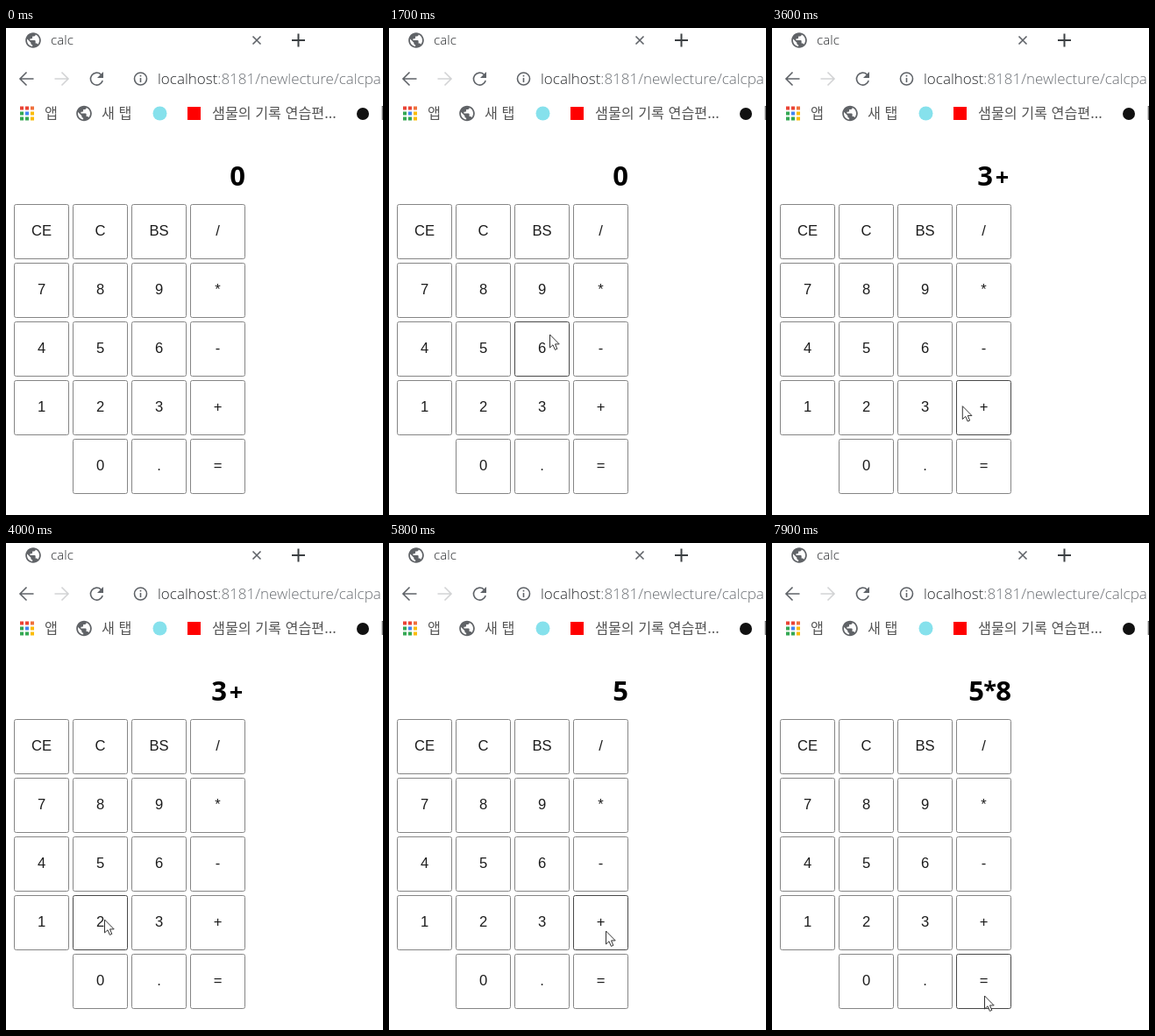
Write an HTML page that moves like this. It is 430x556 px and loops after 8000 ms.

```html
<!DOCTYPE html>
<html lang="ko">
<head>
<meta charset="utf-8">
<title>calc</title>
<style>
  html, body { margin: 0; width: 100%; height: 100%; overflow: hidden; background: #fff; }
  svg { display: block; }
  .latin { font-family: "Open Sans", sans-serif; font-weight: 300; fill: #26282b; }
  .korean { font: 300 16.2px "Noto Sans CJK KR", "Noto Sans CJK", sans-serif; fill: #555; }
  .line { fill: none; stroke: #5f6368; stroke-width: 1.6; }
  .keys { font: 16.6px "Liberation Sans", Arial, sans-serif; text-anchor: middle; fill: #1c1c1c; }
  .keys rect { fill: #fff; stroke: #858585; }
  .keys rect.hover { stroke: #484848; }
  #display { font: 700 31px "Open Sans", sans-serif; text-anchor: middle; }
  #display .operator { font-size: 27px; }
</style>
</head>
<body>
<svg width="430" height="556" viewBox="0 0 430 556">
  <defs>
    <path id="globe" fill="#606367" transform="scale(.88) translate(-12 -12)" d="M12 2C6.48 2 2 6.48 2 12s4.48 10 10 10 10-4.48 10-10S17.52 2 12 2zm-1 17.93c-3.95-.49-7-3.85-7-7.93 0-.62.08-1.21.21-1.79L9 15v1c0 1.1.9 2 2 2v1.93zm6.9-2.54c-.26-.81-1-1.39-1.9-1.39h-1v-3c0-.55-.45-1-1-1H8v-2h2c.55 0 1-.45 1-1V7h2c1.1 0 2-.9 2-2v-.41c2.93 1.19 5 4.06 5 7.41 0 2.08-.8 3.97-2.1 5.39z"/>
    <path id="arrow" d="M8 -7.5L.5 0L8 7.5M.5 0H16"/>
  </defs>

  <!-- Tab strip -->
  <use href="#globe" x="31" y="14"/>
  <text class="latin" x="51" y="19" font-size="15.2">calc</text>
  <path class="line" d="M281.5 9.5l9 9m0 -9l-9 9"/>
  <path class="line" style="stroke:#3c4043;stroke-width:2" d="M326 14h15M333.5 6.5v15"/>

  <!-- Address bar -->
  <use class="line" href="#arrow" x="15.5" y="58"/>
  <use class="line" href="#arrow" transform="translate(71.5 58) scale(-1 1)" style="stroke:#d2d3d5"/>
  <path class="line" d="M108.5 53.2A7 7 0 1 0 110.2 60"/>
  <path fill="#5f6368" d="M111 50v7h-7z"/>
  <circle class="line" cx="153.5" cy="58" r="7"/>
  <path class="line" d="M153.5 57v5M153.5 53.8v1.8"/>
  <text class="latin" x="173" y="64" font-size="17">localhost<tspan fill="#6a6e73">:8181/newlecture/calcpa</tspan></text>

  <!-- Bookmarks -->
  <g id="apps"></g>
  <text class="korean" x="44" y="103">앱</text>
  <use href="#globe" x="89" y="97.5"/>
  <text class="korean" x="109" y="103">새 탭</text>
  <circle cx="175.5" cy="97.5" r="8" fill="#86e1ec"/>
  <rect x="207" y="90" width="15" height="15" fill="#f00"/>
  <text class="korean" x="235" y="103">샘물의 기록 연습편...</text>
  <circle cx="407" cy="98" r="7" fill="#111"/>
  <text class="korean" x="427" y="103">[</text>

  <text id="display"></text>
  <g id="keys" class="keys"></g>
  <path id="cursor" fill="#fff" stroke="#333" d="M.5 1V16L4 12.8L6.4 18.4L8.8 17.4L6.5 11.9H11.2z"/>
</svg>
<script>
const LOOP = 8000, STEP = 100;
const PITCH = 67, KEY = 62, LEFT = 9.5, TOP = 201.5;

// Pointer stops: time, x, y
const stops = [
  [1000, 436, 262], [1400, 262, 302], [1700, 183, 349], [1900, 181, 421], [2000, 180, 425],
  [3050, 180, 425], [3300, 236, 431], [3500, 236, 431], [3900, 113, 429], [4000, 112, 429],
  [4250, 112, 429], [4550, 243, 504], [5450, 243, 504], [5800, 247, 442], [6250, 240, 352],
  [6500, 236, 301], [6750, 236, 301], [6850, 234, 299], [6900, 234, 299], [7200, 113, 303],
  [7500, 113, 303], [7850, 242, 516]
];

// Key presses: time and the resulting display
const presses = [
  [0, "0"], [2800, "3"], [3400, "3+"], [4200, "3+2"], [4900, "5"], [6600, "5*"], [7400, "5*8"]
];

const DIGIT = { width: 18, y: 180 };
const operators = { "+": { width: 21, y: 180 }, "*": { width: 13, y: 177 } };

const byId = id => document.getElementById(id);
const display = byId("display"), cursor = byId("cursor");

function add(parent, name, attributes, text = "") {
  const node = document.createElementNS("http://www.w3.org/2000/svg", name);
  for (const key in attributes) node.setAttribute(key, attributes[key]);
  node.textContent = text;
  return parent.appendChild(node);
}

["#ea4335", "#ea4335", "#f0703c", "#34a853", "#4285f4", "#fbbc05", "#34a853", "#34a853", "#fbbc05"]
  .forEach((fill, i) => add(byId("apps"), "rect", {
    x: 16 + i % 3 * 6, y: 89.5 + Math.floor(i / 3) * 6, width: 4, height: 4, fill
  }));

const keys = [];
["CE", "C", "BS", "/", ..."789*456-123+", "", ..."0.="].forEach((label, i) => {
  if (!label) return;
  const x = LEFT + i % 4 * PITCH, y = TOP + Math.floor(i / 4) * PITCH;
  const rect = add(byId("keys"), "rect", { x, y, width: KEY, height: KEY, rx: 2 });
  add(byId("keys"), "text", { x: x + KEY / 2, y: y + KEY / 2 + 4.7 }, label);
  keys.push({ x, y, rect });
});

function pointerAt(time) {
  const next = stops.findIndex(stop => stop[0] > time);
  if (next === 0) return [440, 262];
  if (next < 0) return stops[stops.length - 1].slice(1);
  const [t0, x0, y0] = stops[next - 1], [t1, x1, y1] = stops[next];
  const u = (time - t0) / (t1 - t0), ease = u * u * (3 - 2 * u);
  return [x0 + (x1 - x0) * ease, y0 + (y1 - y0) * ease];
}

// Right-aligned, laid out from the last character backwards
function showValue(value) {
  display.replaceChildren();
  let right = 273;
  for (const char of [...value].reverse()) {
    const { width, y } = operators[char] || DIGIT;
    right -= width;
    const kind = operators[char] ? "operator" : "digit";
    add(display, "tspan", { x: right + width / 2, y, class: kind }, char);
  }
}

function draw(now) {
  const time = Math.floor(now % LOOP / STEP) * STEP;
  const [pressTime, value] = presses.filter(press => press[0] <= time).pop();
  const [x, y] = pointerAt(time), [px, py] = pointerAt(pressTime);
  // Each press reloads the page, so hover returns only once the pointer moves.
  const moved = x !== px || y !== py;
  for (const key of keys) {
    const inside = x >= key.x && x <= key.x + KEY && y >= key.y && y <= key.y + KEY;
    key.rect.classList.toggle("hover", moved && inside);
  }
  cursor.setAttribute("transform", `translate(${x} ${y})`);
  showValue(value);
}

const start = performance.now();
function tick() {
  draw(performance.now() - start);
  requestAnimationFrame(tick);
}
tick();
</script>
</body>
</html>
```
